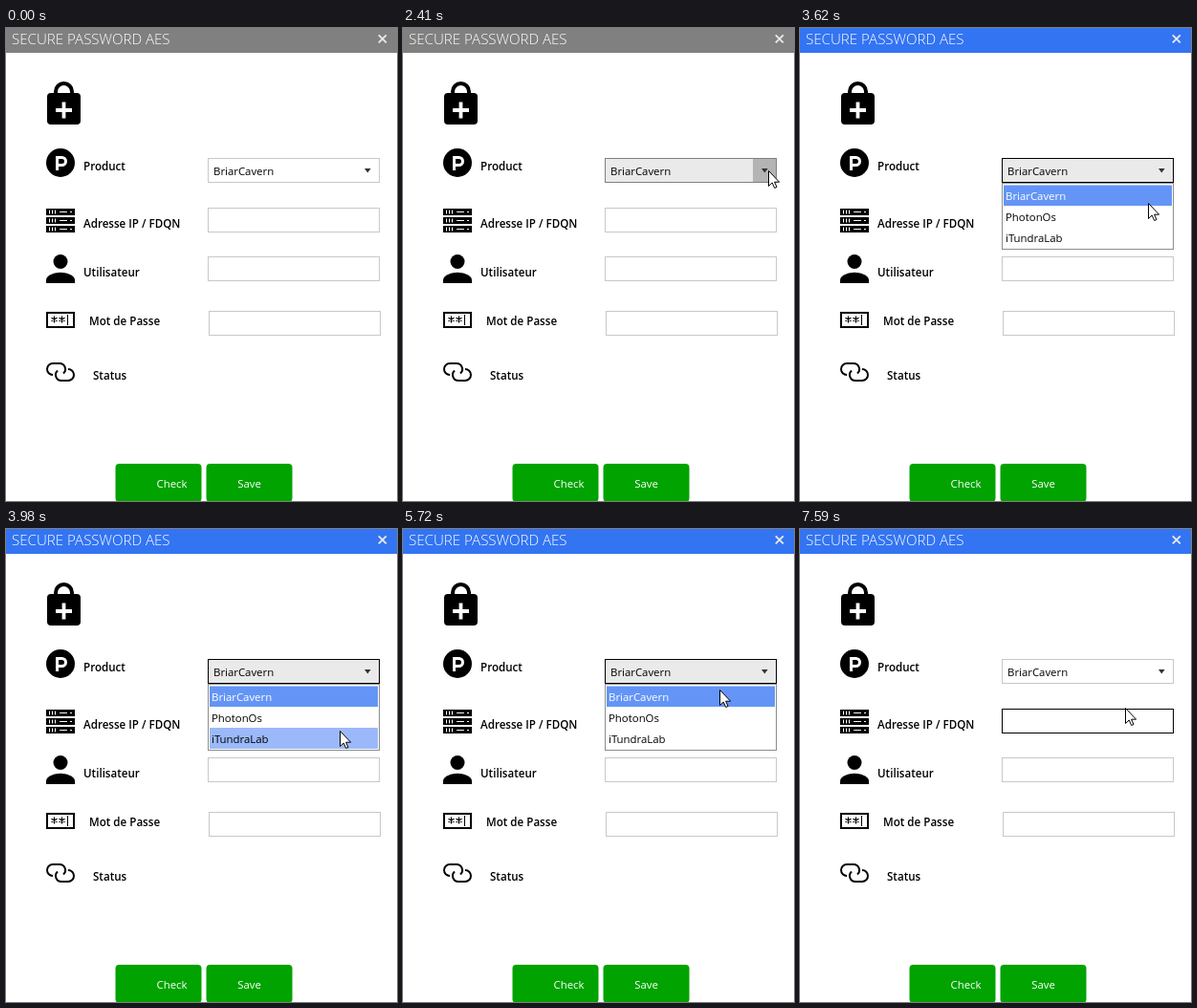
Write an HTML page that moves like this. It is 409 px wide and 495 px high and loops after 8 s.

```html
<!DOCTYPE html>
<html lang="fr">
<head>
<meta charset="utf-8">
<title>Secure password</title>
<style>
  html, body { margin: 0; height: 100%; overflow: hidden; background: #fff; }
  svg { display: block; width: 100vw; height: 100vh; font: 11.4px "Open Sans", "Noto Sans", sans-serif; }
  .label { font-size: 11.6px; font-weight: 600; }
  .title { font-size: 15.1px; font-weight: 300; fill: #fff; }
  .field { fill: #fff; stroke: #c8c8c8; }
  .line { fill: none; stroke: #000; }
</style>
</head>
<body>
<svg viewBox="0 0 409 495">
  <rect id="bar" width="409" height="26"/>
  <text class="title" x="6" y="17">SECURE PASSWORD AES</text>
  <path d="M389.8 7.300l8 8m0-8l-8 8" stroke="#e8e8e8" stroke-width="1.9"/>

  <!-- lock -->
  <rect x="43" y="68" width="35" height="33" rx="4"/>
  <path class="line" d="M52 69v-2.500a8.500 8.500 0 0 1 17 0v2.500" stroke-width="4"/>
  <path d="M52 86h17M60.500 77.500v17" stroke="#fff" stroke-width="3.800"/>

  <!-- product -->
  <circle cx="57" cy="141" r="15"/>
  <path d="M53.500 149v-13.500h5a4 4 0 0 1 0 8h-5" fill="none" stroke="#fff" stroke-width="3"/>

  <!-- servers -->
  <g id="servers"></g>

  <!-- user -->
  <circle cx="57" cy="244.500" r="7.500"/>
  <path d="M42 267v-3.500c0-5 10-7.700 15-7.700s15 2.700 15 7.700v3.500z"/>

  <!-- password -->
  <rect class="line" x="43" y="298" width="28" height="15" stroke-width="2"/>
  <path id="stars" class="line" stroke-width="1.300"/>
  <path class="line" d="M64.500 300v11"/>

  <!-- link -->
  <g class="line" stroke-width="2">
    <path id="loop" d="M49 363a6 6 0 0 1 0-12h7a6 6 0 0 1 4 10.500"/>
    <use href="#loop" transform="rotate(180 57 360)"/>
  </g>

  <g class="label">
    <text x="81" y="149">Product</text>
    <text x="81" y="209">Adresse IP / FDQN</text>
    <text x="81" y="260">Utilisateur</text>
    <text x="87" y="311">Mot de Passe</text>
    <text x="91" y="368">Status</text>
  </g>

  <rect id="address" class="field" x="211.500" y="188.500" width="179" height="25"/>
  <rect class="field" x="211.500" y="239.500" width="179" height="25"/>
  <rect class="field" x="212.500" y="296.500" width="179" height="25"/>
  <path id="caret" d="M217.500 192v17" stroke="#000"/>

  <rect id="combo" x="211.500" y="136.500" width="179" height="25"/>
  <rect id="drop" x="366" y="137" width="24" height="24" fill="#b4b4b4"/>
  <path d="M375 147h6.600l-3.300 4.400z" fill="#333"/>
  <text x="217" y="154">BriarCavern</text>

  <g id="popup">
    <rect x="211.500" y="162.500" width="179" height="69" fill="#fff" stroke="#8c8c8c"/>
    <path d="M211 161.500h180" stroke="#000"/>
    <rect x="213" y="164.500" width="176" height="21.500" fill="#6495f6"/>
    <rect id="hover" x="213" width="176" height="22" fill="#9bb9fa"/>
    <text x="215" y="180" fill="#fff">BriarCavern</text>
    <text x="215" y="202">PhotonOs</text>
    <text x="215" y="224">iTundraLab</text>
  </g>

  <g fill="#00a300">
    <rect x="114.500" y="456" width="90" height="40" rx="4"/>
    <rect x="209.500" y="456" width="90" height="40" rx="4"/>
  </g>
  <g fill="#fff" text-anchor="middle">
    <text x="173.500" y="481">Check</text>
    <text x="254.500" y="481">Save</text>
  </g>

  <path id="cursor" d="M.5 .5v16l3.700-3.500 2.500 5.500 2.300-1-2.400-5.300h5z" fill="#fff" stroke="#000"/>
</svg>
<script>
const $ = id => document.getElementById(id);
const set = (id, attrs) => { for (const k in attrs) $(id).setAttribute(k, attrs[k]); };
const show = (id, on) => set(id, { visibility: on ? 'visible' : 'hidden' });

$('servers').innerHTML = [189, 198, 207].map(y =>
  `<rect x="42" y="${y}" width="30" height="7"/>
   <path d="M45.500 ${y + 1.5}v4m3-4v4m3-4v4M56 ${y + 3.5}h8m3 0h2" stroke="#fff"/>`).join('');
$('stars').setAttribute('d', [50.5, 58.5].map(x =>
  `M${x} 301.500v7m-3-5.200l6 3.400m0-3.400l-6 3.400`).join(''));

// Pointer moves: start, end, steps, from, to, easing
const out = p => 1 - (1 - p) ** 1.7;
const smooth = p => p * p * (3 - 2 * p);
const moves = [
  [1430, 1950, 8, [392, 60], [383, 149], out],
  [2410, 2410, 1, [383, 149], [382, 149], out],
  [3400, 4200, 12, [382, 149], [345, 218], out],
  [4740, 4960, 4, [345, 218], [345, 183], smooth],
  [5420, 5720, 5, [345, 183], [331, 168], smooth],
  [6320, 6760, 7, [331, 168], [329, 190], smooth],
  [7290, 7430, 3, [329, 190], [340, 187], smooth]
];

function pointer(t) {
  const move = moves.filter(m => m[0] <= t).pop();
  if (!move) return null;
  const [a, b, n, from, to, ease] = move;
  const step = t >= b ? n : Math.floor((t - a) / (b - a) * (n - 1) + 1.05);
  const e = ease(step / n);
  return from.map((v, i) => Math.round(v + (to[i] - v) * e));
}

function draw(t) {
  const pos = pointer(t);
  const [x, y] = pos || [0, 0];
  const over = (top, bottom) => x >= 211 && x < 391 && y >= top && y < bottom;
  const active = t >= 2570, open = active && t < 5860;
  const onCombo = over(136, 162), typing = t >= 7070;

  set('bar', { fill: active ? '#3374f2' : '#808080' });
  set('combo', {
    fill: open || onCombo ? '#eaeaea' : '#fff',
    stroke: active && !typing ? '#000' : onCombo ? '#808080' : '#c8c8c8'
  });
  show('drop', onCombo && x >= 366);

  set('popup', { opacity: t < 2640 ? 0 : t < 2710 ? 0.5 : 1 });
  show('popup', open);
  const row = Math.floor((y - 164) / 22);
  set('hover', { y: 164 + 22 * row });
  show('hover', open && (row === 1 || row === 2));

  $('address').style.stroke = typing ? '#000' : over(188, 214) && !open ? '#808080' : '';
  show('caret', typing && t < 7590);
  show('cursor', pos);
  set('cursor', { transform: `translate(${x} ${y})` });
}

function tick() {
  draw(performance.now() % 8000);
  requestAnimationFrame(tick);
}
tick();
</script>
</body>
</html>
```
